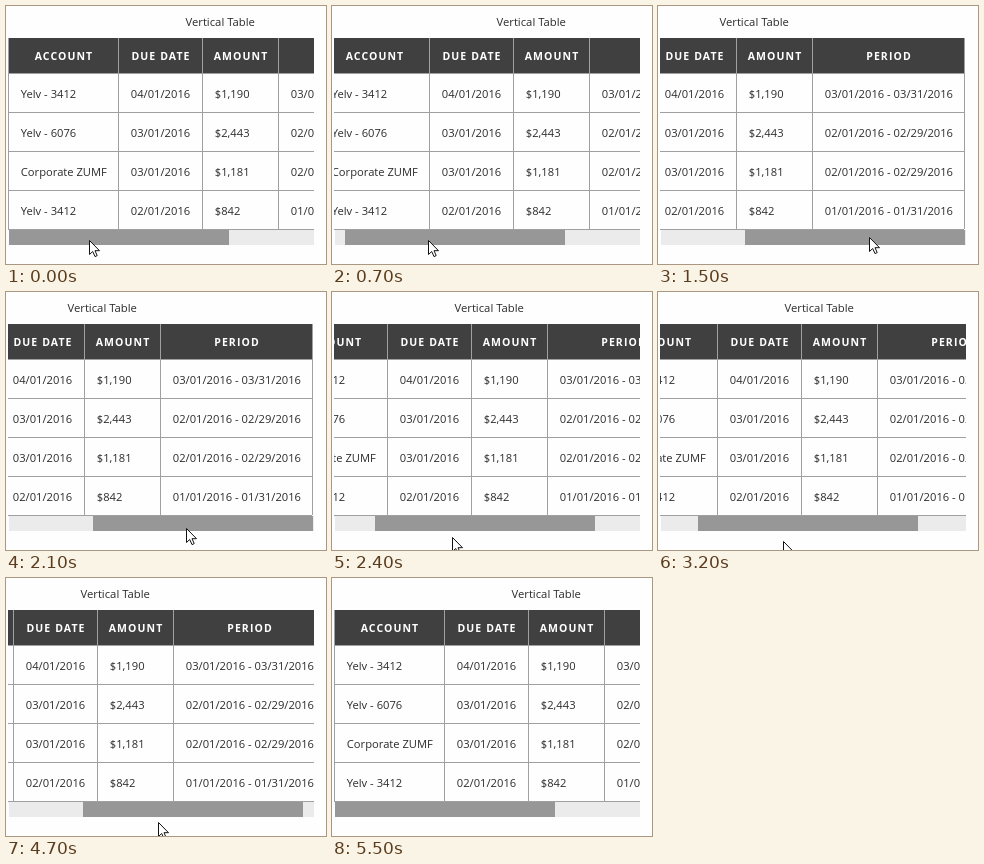
Animation, 320 px wide and 258 px high, one loop 5.8 s. Source, as an HTML page:

```html
<!DOCTYPE html>
<html lang="en">
<head>
<meta charset="utf-8">
<title>Vertical Table</title>
<style>
  html, body { margin: 0; width: 100%; height: 100%; overflow: hidden; background: #fefefe; }
  svg { display: block; width: 320px; height: 258px; }
  text { font: 11.2px "Open Sans", sans-serif; fill: #2c2c2c; white-space: pre; }
  .caption { font-size: 11.3px; text-anchor: middle; }
  .head { font-size: 10.5px; font-weight: 700; letter-spacing: 1.1px; fill: #fff; text-anchor: middle; }
</style>
</head>
<body>
<svg viewBox="0 0 320 258">
  <clipPath id="window"><rect x="2" width="306" height="258"/></clipPath>
  <g clip-path="url(#window)"><g id="table"></g></g>
  <rect x="3" y="224" width="305" height="15" fill="#ebebeb"/>
  <rect id="thumb" x="3" y="224" width="220" height="15" fill="#979797"/>
  <path id="cursor" d="M.5.5V14.5L3.7 11.5L6 16.6L8.2 15.6L6 10.7H10.5Z" fill="#fff" stroke="#111"/>
</svg>
<script>
const LOOP = 5800, STEP = 100, LAG = 20;
const MAX_SCROLL = 118, THUMB_TRAVEL = 84;
const TOP = 32, HEAD = 35, ROW = 39, PADDING = 12.8;
const table = document.getElementById('table');
const thumb = document.getElementById('thumb');
const cursor = document.getElementById('cursor');

function add(tag, attributes, content = '') {
  const node = document.createElementNS('http://www.w3.org/2000/svg', tag);
  for (const name in attributes) node.setAttribute(name, attributes[name]);
  node.textContent = content;
  table.append(node);
}
const box = (x, y, width, height, fill) => add('rect', { x, y, width, height, fill });

const edges = [2, 112, 196, 272, 424];
const labels = ['ACCOUNT', 'DUE DATE', 'AMOUNT', 'PERIOD'];
const rows = [
  ['Yelv - 3412', '04/01/2016', '$1,190', '03/01/2016 - 03/31/2016'],
  ['Yelv - 6076', '03/01/2016', '$2,443', '02/01/2016 - 02/29/2016'],
  ['Corporate ZUMF', '03/01/2016', '$1,181', '02/01/2016 - 02/29/2016'],
  ['Yelv - 3412', '02/01/2016', '$842', '01/01/2016 - 01/31/2016']
];

const width = edges.at(-1) - edges[0];
const bodyTop = TOP + HEAD;
box(edges[0], TOP, width, HEAD, '#414040');
edges.forEach(x => box(x, TOP, 1, HEAD + ROW * rows.length, '#a0a0a0'));
for (let r = 0; r <= rows.length; r++) box(edges[0], bodyTop + ROW * r, width, 1, '#a0a0a0');

add('text', { x: 214.2, y: 20, class: 'caption' }, 'Vertical Table');
labels.forEach((label, c) =>
  add('text', { x: (edges[c] + edges[c + 1]) / 2 + 1, y: 54, class: 'head' }, label));
rows.forEach((row, r) => row.forEach((value, c) =>
  add('text', { x: edges[c] + PADDING, y: bodyTop + ROW * r + 25 }, value)));

// The hand rests between these eased moves.
const home = { x: 83, y: 234 };
const moves = [
  { start: 525, end: 1400, x: 211, y: 231 },
  { start: 1800, end: 2790, x: 72, y: 253 },
  { start: 2800, end: 3856, x: 236, y: 242 },
  { start: 4200, end: 5300, x: 42, y: 246 },
  { start: 5400, end: 5500, x: 36, y: 262 }
];
const clamp = (value, max) => Math.min(Math.max(value, 0), max);

function cursorAt(time) {
  return moves.reduce((from, to) => {
    const u = clamp((time - to.start) / (to.end - to.start), 1);
    const eased = u * u * (3 - 2 * u);
    return { x: from.x + (to.x - from.x) * eased, y: from.y + (to.y - from.y) * eased };
  }, home);
}

function draw() {
  const time = Math.floor(performance.now() % LOOP / STEP) * STEP;
  const { x, y } = cursorAt(time);
  const dragged = clamp(cursorAt(time - LAG).x - home.x, THUMB_TRAVEL);
  const scroll = Math.round(dragged * MAX_SCROLL / THUMB_TRAVEL);
  table.setAttribute('transform', `translate(${-scroll} 0)`);
  thumb.setAttribute('x', 3 + Math.floor(dragged));
  cursor.setAttribute('transform', `translate(${Math.round(x)} ${Math.round(y)})`);
  requestAnimationFrame(draw);
}
draw();
</script>
</body>
</html>
```
